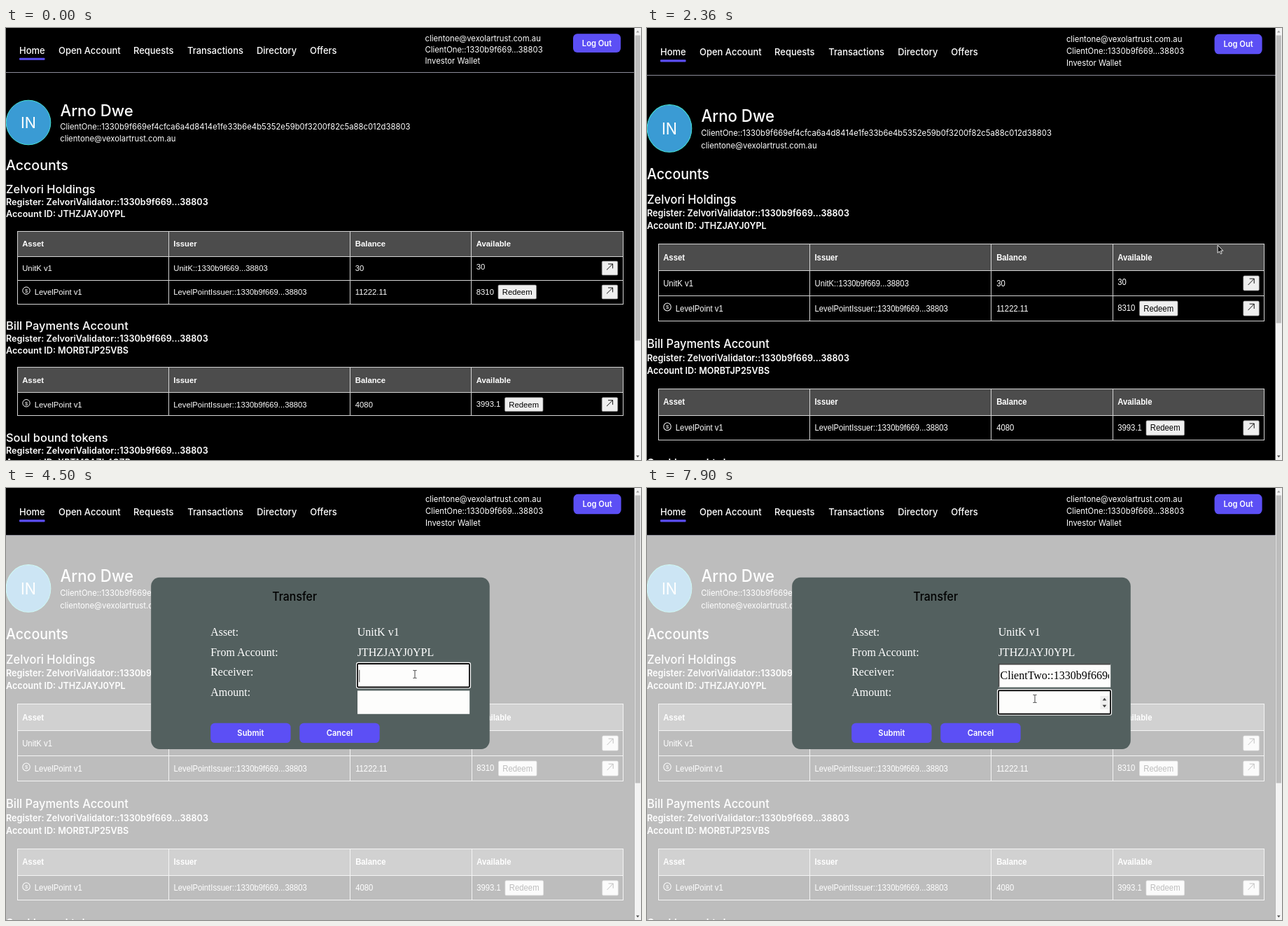
These frames come from a looping animation (907x617 px, 8 s). An HTML page:

```html
<!DOCTYPE html>
<html lang="en">
<head>
<meta charset="utf-8">
<title>Account transfer</title>
<style>
  html, body { margin: 0; width: 100%; height: 100%; overflow: hidden; background: #000; }
  svg { display: block; }
  text { white-space: pre; }
  .ui { font-family: Inter, sans-serif; }
  .cell { font-family: "Liberation Sans", Arial, sans-serif; font-size: 11.3px; }
  .form { font-family: "Liberation Serif", Times, serif; font-size: 16px; }
  .grid { fill: none; stroke: #d4d4d4; stroke-width: 1; vector-effect: non-scaling-stroke; shape-rendering: crispEdges; }
</style>
</head>
<body>
<svg id="stage" width="907" height="617" viewBox="0 0 907 617"></svg>
<script>
const LOOP = 8000;
const STRETCH = 1.0625;
const PURPLE = '#5c4ff5';
const SHORT = '1330b9f669...38803';
const HASH = '1330b9f669ef4cfca6a4d8414e1fe33b6e4b5352e59b0f3200f82c5a88c012d38803';
const MAIL = 'clientone@vexolartrust.com.au';
const REGISTER = 'Register: ZelvoriValidator::' + SHORT;

const text = (x, y, s, cls, attrs = '') => `<text x="${x}" y="${y}" class="${cls}" ${attrs}>${s}</text>`;
const ui = (x, y, s, size = 11.3, weight = 400, attrs = '') =>
  text(x, y, s, 'ui', `font-size="${size}" font-weight="${weight}" ${attrs}`);
const cell = (x, y, s, attrs) => text(x, y, s, 'cell', attrs);
const form = (x, y, s, attrs) => text(x, y, s, 'form', attrs);
const rect = (x, y, w, h, fill, attrs = '') =>
  `<rect x="${x}" y="${y}" width="${w}" height="${h}" fill="${fill}" ${attrs}/>`;
const path = (d, attrs) => `<path d="${d}" ${attrs}/>`;

function purpleButton(x, y, w, h, label) {
  return rect(x, y, w, h, PURPLE, 'rx="6"') +
    ui(x + w / 2, y + h / 2 + 4, label, 11.2, 600, 'text-anchor="middle"');
}

function greyButton(x, y, w) {
  return rect(x, y, w, 19.8, '#efefef', 'rx="1.5" stroke="#8a8a8a" stroke-width=".7"');
}

function header() {
  const links = [[19, 'Home'], [75, 'Open Account'], [182, 'Requests'],
    [259, 'Transactions'], [358, 'Directory'], [434, 'Offers']];
  return rect(0, 0, 897, 64, '#000') +
    links.map(([x, s]) => ui(x, 36.7, s, 12.96, 500)).join('') +
    rect(19, 42.7, 36.5, 3, PURPLE, 'rx="1"') +
    [MAIL, 'ClientOne::' + SHORT, 'Investor Wallet']
      .map((s, i) => ui(598.5, 19.2 + i * 15.8, s)).join('') +
    purpleButton(810, 8.3, 68, 26.8, 'Log Out') +
    path('M0 63.6H897', 'class="grid" style="stroke:#8c8c98"');
}

function account(y, name, id) {
  return ui(0, y, name, 16.4, 500) + ui(0, y + 17.2, REGISTER, 12.6, 600) +
    ui(0, y + 34.2, 'Account ID: ' + id, 12.6, 600);
}

function table(top, rows) {
  const bottom = top + 36 + rows.length * 34 - (rows.length === 1 ? 1 : 0);
  const columns = [23.2, 239.3, 498.8, 671.8];
  let out = rect(16.5, top, 864.5, 36, '#4c4c4c');
  ['Asset', 'Issuer', 'Balance', 'Available'].forEach((s, i) => {
    out += cell(columns[i], top + 22, s, 'font-weight="700"');
  });
  rows.forEach(([asset, balance, available, redeemX], i) => {
    const y = top + 36 + i * 34;
    const base = y + 20.8;
    if (redeemX) {
      out += `<circle cx="29" cy="${y + 15}" r="5.2" fill="none" stroke="#fff"/>` +
        cell(29, y + 17.7, '$', 'style="font-size:7.5px" text-anchor="middle"') +
        greyButton(redeemX, y + 7, 54.5) +
        cell(redeemX + 27.2, base, 'Redeem', 'fill="#000" text-anchor="middle"');
    }
    out += cell(redeemX ? 40.8 : columns[0], base, asset + ' v1') +
      cell(columns[1], base, asset + (redeemX ? 'Issuer::' : '::') + SHORT) +
      cell(columns[2], base, balance) +
      cell(columns[3], base - (redeemX ? 0.4 : 1.6), available) +
      greyButton(851.2, y + 7, 22.5) +
      path(`M858 ${y + 19.3}l8.6-8.4m-6.6 0h6.6v6.4`, 'fill="none" stroke="#000" stroke-width=".9"');
  });
  let lines = `M16.5 ${top}H881V${bottom}H16.5Z`;
  rows.forEach((_, i) => { lines += `M16.5 ${top + 36 + i * 34}H881`; });
  [232.5, 491.5, 664.6].forEach(x => { lines += `M${x} ${top}V${bottom}`; });
  return out + path(lines, 'class="grid"');
}

function content() {
  return '<circle cx="32" cy="135" r="31.8" fill="#3a9bd4" stroke="#45e0d4"/>' +
    ui(32, 142.7, 'IN', 21.5, 400, 'text-anchor="middle"') +
    ui(77.5, 125.7, 'Arno Dwe', 22.2, 500) +
    ui(77.2, 144.8, 'ClientOne::' + HASH) + ui(77.2, 161.8, MAIL) +
    ui(0, 203, 'Accounts', 19.6, 500) +
    account(235.8, 'Zelvori Holdings', 'JTHZJAYJ0YPL') +
    table(290.1, [['UnitK', '30', '30', 0], ['LevelPoint', '11222.11', '8310', 703]]) +
    account(430.6, 'Bill Payments Account', 'MORBTJP25VBS') +
    table(484.8, [['LevelPoint', '4080', '3993.1', 712.5]]) +
    account(591, 'Soul bound tokens', 'XRTMSAZL4CZR');
}

// Focus outline of an input: white halo with a black ring inside.
const ring = (id, y) => `<g id="${id}" fill="none">` +
  rect(500.7, y - 1, 161.8, 33.3, 'none', 'rx="2" stroke="#fff" stroke-width="2.2"') +
  rect(501.7, y, 159.8, 31.5, 'none', 'rx="1" stroke="#0a0a0a" stroke-width="1.8"') + '</g>';

function modal() {
  const labels = [['Asset:', 'UnitK v1'], ['From Account:', 'JTHZJAYJ0YPL'], ['Receiver:', ''], ['Amount:', '']];
  return rect(0, 64, 897, 530, '#fff', 'opacity=".74"') +
    rect(207, 120.3, 483.3, 230.7, '#53605f', 'rx="12"') +
    ui(380, 151.8, 'Transfer', 15.9, 500, 'fill="#000"') +
    labels.map(([a, b], i) => form(292, 198.5 + i * 27.1, a) + form(501.3, 198.5 + i * 27.1, b)).join('') +
    rect(501.7, 236.2, 160, 31.7, '#fdfdfc') + rect(501.7, 272.4, 160, 31.4, '#fdfdfc') +
    path('M502.3 267.5V236.8H661.5', 'id="inset" fill="none" stroke="#444" stroke-width="1.5"') +
    ring('receiverRing', 236.2) + ring('amountRing', 272.3) +
    '<svg x="503.5" y="238" width="156" height="28" viewBox="503.5 238 156 28">' +
    form(504.2, 257, 'ClientTwo::' + HASH, 'id="start" fill="#000"') +
    form(659.2, 257, HASH.slice(-26), 'id="tail" fill="#000" text-anchor="end"') + '</svg>' +
    rect(504, 244.5, 0.9, 16.5, '#222', 'id="caret"') +
    '<g id="spinner">' + rect(647, 279.5, 12.5, 18, '#efefef') +
    path('M650.2 285.6h5.6l-2.8-3.4zM650.2 291.6h5.6l-2.8 3.4z', 'fill="#444"') + '</g>' +
    purpleButton(292, 316, 114.3, 26.7, 'Submit') + purpleButton(419, 316, 114.3, 26.7, 'Cancel');
}

const stage = document.getElementById('stage');
stage.innerHTML = rect(0, 0, 907, 617, '#000') +
  `<g id="page" fill="#fff">${content()}<g id="modal">${modal()}</g>${header()}</g>` +
  rect(897.5, 0, 9.5, 617, '#f3f3f3') + rect(898.7, 10.5, 7.2, 411, '#bdbdbd', 'id="thumb"') +
  path('M900 6.5h4.6l-2.3-3z', 'fill="#a0a0a0"') + path('M900 610.5h4.6l-2.3 3z', 'fill="#505050"') +
  path('M0 0V11.2L2.6 8.8 4.4 12.6 6.1 11.8 4.4 8.1H7.8Z', 'id="arrow" fill="#111" stroke="#fff" stroke-width=".9"') +
  path('M-2.5-5.5H-.8L0-5 .8-5.5H2.5M0-5V5M-2.5 5.5H-.8L0 5 .8 5.5H2.5',
    'id="beam" fill="none" stroke="#444" stroke-width="1"');

const part = id => document.getElementById(id);
const show = (id, on) => part(id).setAttribute('display', on ? 'inline' : 'none');
const place = (id, x, y) => part(id).setAttribute('transform', `translate(${x} ${y})`);

// Pointer stops: time, x, y.
const STOPS = [[0, 160, -18], [30, 160, -18], [380, 172, -2.5], [690, 172, -2.5], [1040, 640, 150],
  [1190, 640, 150], [1450, 751, 236], [1980, 800, 290], [2020, 800, 290], [2190, 815, 310],
  [2360, 815, 310], [3010, 869, 360], [3710, 869, 360], [4420, 584, 266], [6370, 584, 266],
  [6510, 579, 298], [6820, 570, 304], [7440, 570, 304], [7900, 554, 301], [LOOP, 554, 301]];

function pointerAt(t) {
  const i = STOPS.findIndex(s => s[0] > t);
  const [t0, x0, y0] = STOPS[i - 1], [t1, x1, y1] = STOPS[i];
  const k = (t - t0) / (t1 - t0);
  return [x0 + (x1 - x0) * k, y0 + (y1 - y0) * k];
}

const OPEN = 3370, FOCUS = 4420, PASTE = 5340, AMOUNT = 7080;
const CARET = [[FOCUS, 5100], [PASTE, 6020], [6500, 7620]];

function draw(t) {
  const settled = t >= 30;
  part('page').setAttribute('transform', settled ? `scale(1.0007 ${STRETCH})` : '');
  part('thumb').setAttribute('height', settled ? 411 : 436);

  const inAmount = t >= AMOUNT;
  show('modal', t >= OPEN);
  show('receiverRing', t >= FOCUS && !inAmount);
  show('amountRing', inAmount);
  show('inset', inAmount);
  show('tail', t >= PASTE && !inAmount);
  show('start', inAmount);
  show('caret', CARET.some(([a, b]) => t >= a && t < b));
  part('caret').setAttribute('x', t >= PASTE && !inAmount ? 658.8 : 504);
  part('caret').setAttribute('y', inAmount ? 280.5 : 244.5);

  const [x, y] = pointerAt(t);
  const overInput = t >= OPEN && x > 501 && x < 662 && y > 251 && y < 323;
  show('spinner', overInput && y > 289);
  show('arrow', !overInput);
  show('beam', overInput);
  place('arrow', x, y);
  place('beam', x, y);
}

const begin = performance.now();
function tick() {
  draw((performance.now() - begin) % LOOP);
  requestAnimationFrame(tick);
}
tick();
</script>
</body>
</html>
```
